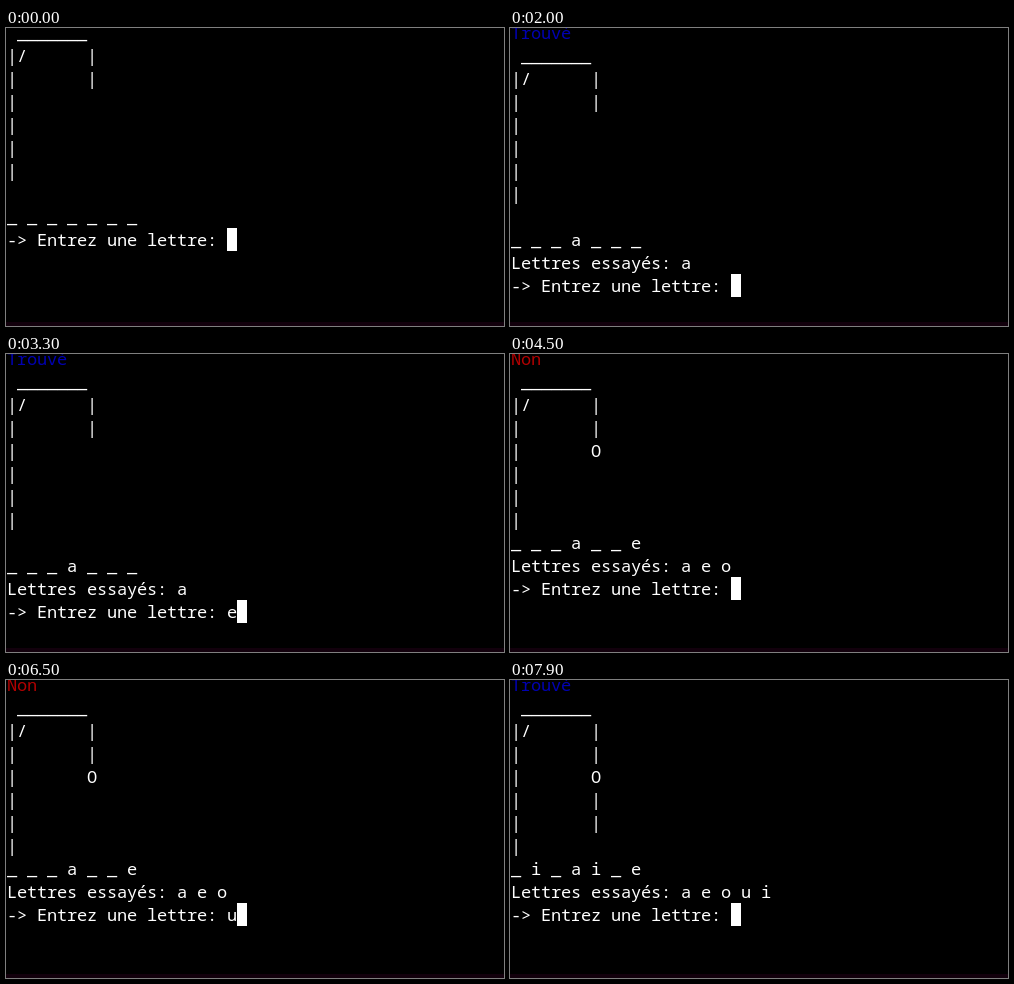
Animation of 498x298 px, one loop 8000 ms. Source, as an HTML page:

```html
<!DOCTYPE html>
<html lang="fr">
<head>
<meta charset="utf-8">
<title>Pendu</title>
<style>
  html, body { margin: 0; width: 100%; height: 100%; overflow: hidden; background: #000; }
  body { position: relative; }
  /* Terminal grid: cells of 10 by 23 pixels */
  #screen {
    position: absolute; left: 1px; top: -7px; margin: 0;
    font: 17px/23px "Noto Sans Mono", monospace;
    letter-spacing: calc(10px - 0.6em);
    font-variant-ligatures: none;
    color: #fff;
  }
  #cursor { position: absolute; width: 10px; height: 23px; background: #fff; }
  #edge { position: absolute; left: 0; right: 0; bottom: 0; height: 4px; background: #12000c; }
  .Trouvé { color: #0000b2; }
  .Non { color: #b20000; }
</style>
</head>
<body>
<pre id="screen"></pre>
<div id="cursor"></div>
<div id="edge"></div>
<script>
const LOOP = 8000;
const PROMPT = "-> Entrez une lettre: ";
const screenEl = document.getElementById("screen");
const cursorEl = document.getElementById("cursor");

// Each turn: start time, time a letter is typed, and the state of the game.
const turns = [
  { at: 0,    typedAt: 1400, key: "a", word: "_______", tried: "",      body: "",    gap: true },
  { at: 2000, typedAt: 3300, key: "e", word: "___a___", tried: "a",     body: "",    gap: true, verdict: "Trouvé" },
  { at: 3500, typedAt: 4300, key: "o", word: "___a__e", tried: "ae",    body: "",    gap: true, verdict: "Trouvé" },
  { at: 4500, typedAt: 6500, key: "u", word: "___a__e", tried: "aeo",   body: "O",   verdict: "Non" },
  { at: 7000, typedAt: 7700, key: "i", word: "___a__e", tried: "aeou",  body: "O||", verdict: "Non" },
  { at: 7900, typedAt: LOOP, key: "",  word: "_i_ai_e", tried: "aeoui", body: "O||", verdict: "Trouvé" },
];

const spaced = letters => [...letters].join(" ");

function gallows(body) {
  const post = [..."||" + body.padEnd(4)];
  return [" _______", ...post.map((part, i) => (i ? "|       " : "|/      ") + part)];
}

function linesOf(turn, input) {
  const lines = gallows(turn.body);
  if (turn.verdict) lines.unshift(`<span class="${turn.verdict}">${turn.verdict}</span>`);
  if (turn.gap) lines.push("");
  lines.push(spaced(turn.word));
  if (turn.tried) lines.push("Lettres essayés: " + spaced(turn.tried));
  lines.push(PROMPT.replace(">", "&gt;") + input);
  return lines;
}

let shown = "";
function render(now) {
  const time = now % LOOP;
  const turn = turns.findLast(t => t.at <= time);
  const input = time >= turn.typedAt ? turn.key : "";
  const state = turn.at + input;
  if (state !== shown) {
    shown = state;
    const lines = linesOf(turn, input);
    screenEl.innerHTML = lines.join("\n");
    cursorEl.style.left = 1 + 10 * (PROMPT.length + input.length) + "px";
    cursorEl.style.top = -7 + 23 * (lines.length - 1) + "px";
  }
}

const start = performance.now();
function tick() {
  render(performance.now() - start);
  requestAnimationFrame(tick);
}
tick();
</script>
</body>
</html>
```
